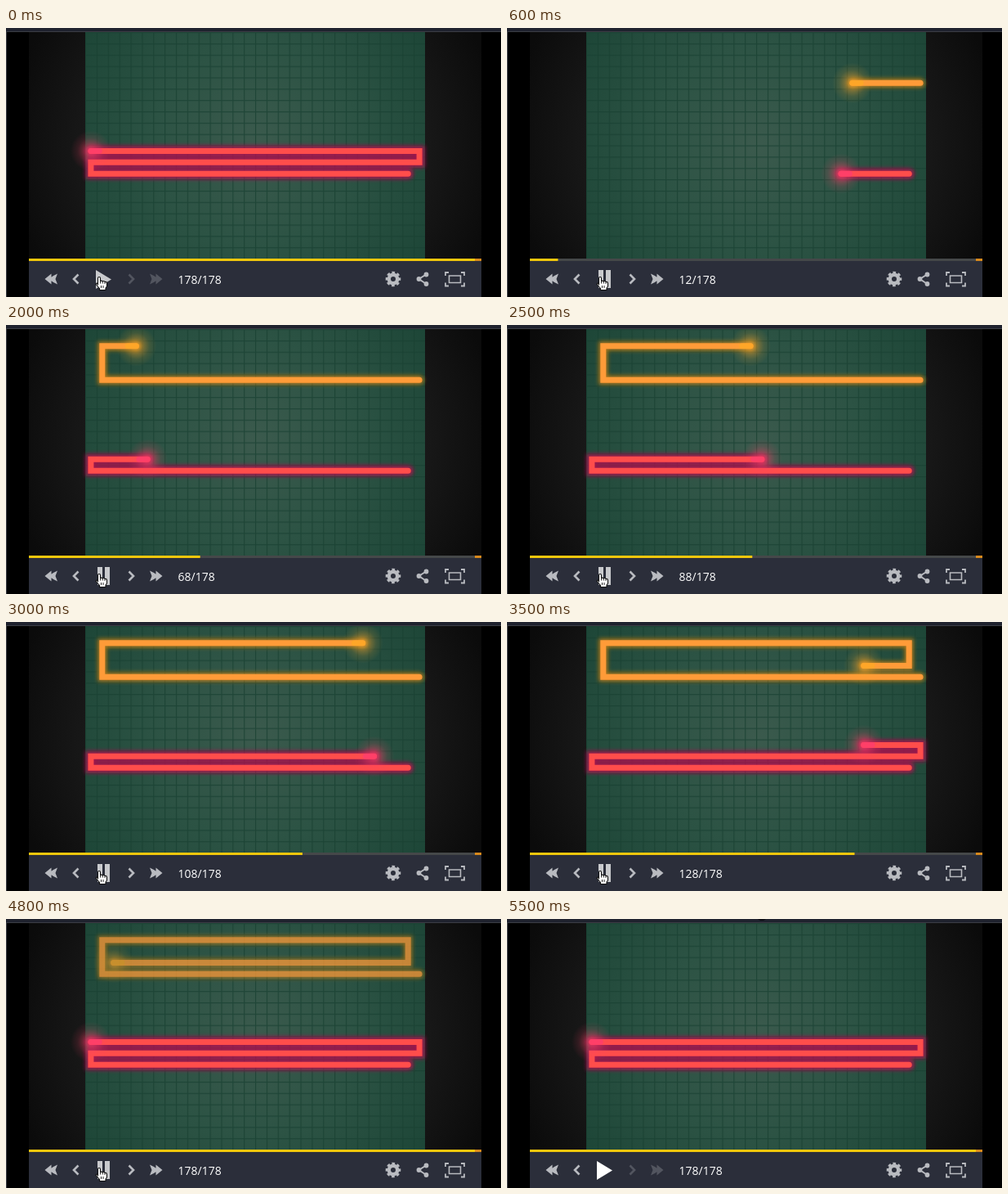
Animation, 606 px wide and 329 px high, one loop 6000 ms. Source, as an HTML page:

```html
<!DOCTYPE html>
<html lang="en">
<head>
<meta charset="utf-8">
<title>Light trails replay</title>
<style>
html, body { margin: 0; width: 100%; height: 100%; overflow: hidden; background: #000; }
svg { display: block; width: 100vw; height: 100vh; }
text { font: 14px "Open Sans", sans-serif; fill: #fff; }
.line { fill: none; stroke-linecap: round; stroke-linejoin: miter; }
</style>
</head>
<body>
<svg viewBox="0 0 606 329">
  <defs>
    <radialGradient id="floor" gradientUnits="userSpaceOnUse" cx="305" cy="143" r="250">
      <stop offset="0" stop-color="#3b5a4d"/>
      <stop offset=".5" stop-color="#2c5344"/>
      <stop offset="1" stop-color="#1d4637"/>
    </radialGradient>
    <radialGradient id="side" gradientUnits="userSpaceOnUse" cx="305" cy="143" r="300">
      <stop offset=".65" stop-color="#1a1a1a"/>
      <stop offset="1" stop-color="#0b0b0b"/>
    </radialGradient>
    <pattern id="grid" patternUnits="userSpaceOnUse" x="97" y="5" width="13.867" height="13.85">
      <path d="M0 .6H13.87M.6 0V13.85" stroke="#183f31" stroke-width="1.3" opacity=".75"/>
    </pattern>
    <filter id="blur" filterUnits="userSpaceOnUse" x="28" y="0" width="554" height="300">
      <feGaussianBlur stdDeviation="2.4"/>
    </filter>
    <clipPath id="view"><path d="M28 5H582V282H28Z"/></clipPath>
    <path id="chev" d="M7.5 1.5 2 7 7.5 12.5" fill="none" stroke-width="2.6"/>
    <path id="dbl" d="M8 .5V4.8L10.5 3 15.5 .5 13 7 15.5 13.5 10.5 11 8 9.2V13.5L0 7Z"/>
  </defs>

  <path fill="#1f222e" d="M0 0H606V4H0Z"/>
  <path fill="#3b3d44" d="M0 4H606V5H0ZM0 5H1V329H0Z"/>
  <path id="notch" fill="#0c0d12" d="M307 0H317L314 2H310Z"/>
  <path fill="url(#side)" d="M28 5H582V282H28Z"/>
  <path fill="url(#floor)" d="M97 5H513V282H97Z"/>
  <path fill="url(#grid)" d="M97 5H513V282H97Z"/>
  <g id="trails" clip-path="url(#view)"></g>

  <path fill="#2b2e3a" d="M28 285H582V329H28Z"/>
  <path fill="#454849" d="M28 282H582V285H28Z"/>
  <rect id="bar" x="28" y="282" height="3" fill="#f2c70c"/>
  <path fill="#d8891c" d="M574 282H582V285H574Z"/>

  <g fill="#b9bbc0" stroke="#b9bbc0" stroke-width="0">
    <use href="#dbl" x="47.5" y="300"/>
    <use href="#chev" x="81" y="300"/>
    <g id="next">
      <use href="#chev" transform="translate(158 300) scale(-1 1)"/>
      <use href="#dbl" transform="translate(191.5 300) scale(-1 1)"/>
    </g>
    <g fill="none">
      <circle cx="474" cy="307" r="5.2" stroke-width="4.4"/>
      <circle cx="474" cy="307" r="7.8" stroke-width="3" stroke-dasharray="3.5 2.626" stroke-dashoffset="1.75"/>
      <path d="M515 301 505.500 307 515 313.500" stroke-width="1.8"/>
      <path d="M542 299H538V303M557 299H561V303M542 315.500H538V311.500M557 315.500H561V311.500" stroke-width="1.8"/>
      <path d="M542.500 303H556.500V311.500H542.500Z" stroke-width="1.6"/>
    </g>
    <circle cx="514.500" cy="301.500" r="2.900"/>
    <circle cx="505.500" cy="307" r="2.900"/>
    <circle cx="514.500" cy="313" r="2.900"/>
  </g>
  <path id="play" d="M110 296 129 307.500 110 319Z"/>
  <path id="pause" fill="#c9cacd" d="M112 296H118V318H112ZM121 296H127V318H121Z"/>
  <text id="count" x="210.500" y="313"></text>
  <g id="hand">
    <path fill="#fff" stroke="#111" stroke-width="1.1" stroke-linejoin="round"
      d="M112.500 314V306Q112.500 304.500 114 304.500T115.500 306V309.500Q117 308.500 118.300 309.800 119.800 309 121 310.500 123.500 310 123.500 312.500V316L122 318V320.500H114.500V318.500L110.500 314Q109.800 312 111.500 312Z"/>
    <path fill="none" stroke="#111" stroke-width=".9" d="M115.500 309.500V312.500M118.300 310V312.500M121 310.500V313M116.500 315V318M119 315V318"/>
  </g>
</svg>
<script>
const LOOP = 6000, TURNS = 178, CELL = 13.867;
const NS = "http://www.w3.org/2000/svg";
const $ = id => document.getElementById(id);

function add(parent, tag, attrs) {
  const el = document.createElementNS(NS, tag);
  for (const k in attrs) el.setAttribute(k, attrs[k]);
  return parent.appendChild(el);
}

const show = (id, on) => $(id).setAttribute("visibility", on ? "visible" : "hidden");
const px = ([c, r]) => [97 + (c + .5) * CELL, 5 + (r + .5) * 13.85];
const toPath = pts => "M" + pts.map(p => px(p).map(v => v.toFixed(2)).join(" ")).join("L");

function makeRider(name, color, headColor, glow, glowWidth, glowAlpha, corners) {
  const g = add($("trails"), "g", {});
  const grad = add(g, "radialGradient", { id: name });
  [[0, .75], [.3, .42], [.65, .13], [1, 0]].forEach(([offset, alpha]) =>
    add(grad, "stop", { offset, "stop-color": headColor, "stop-opacity": alpha }));
  const line = (stroke, width, extra) =>
    add(g, "path", { class: "line", stroke, "stroke-width": width, ...extra });
  return {
    g, corners,
    glow: line(glow, glowWidth, { opacity: glowAlpha, filter: "url(#blur)" }),
    trail: line(color, 7),
    halo: add(g, "circle", { r: 25, fill: `url(#${name})` }),
    tip: line(headColor, 6.6)
  };
}

// Corners are [column, row] cells
const riders = [
  makeRider("amber", "#ff9b38", "#ffa628", "#e58a10", 11, .7,
    [[29, 4], [1, 4], [1, 1], [28, 1], [28, 3], [2, 3]]),
  makeRider("rose", "#ff4d4b", "#ff3f68", "#b30a50", 13, .85,
    [[28, 12], [0, 12], [0, 11], [29, 11], [29, 10], [0, 10]])
];

// Part of the route covered after a number of cell moves
function walk(corners, moves) {
  const pts = [corners[0]];
  for (let i = 1; i < corners.length; i++) {
    const [c, r] = corners[i - 1], [c2, r2] = corners[i];
    const len = Math.abs(c2 - c) + Math.abs(r2 - r);
    const k = Math.min(1, moves / len);
    pts.push([c + (c2 - c) * k, r + (r2 - r) * k]);
    if (moves <= len) break;
    moves -= len;
  }
  return pts;
}

function drawRider(rider, moves, alpha) {
  const pts = walk(rider.corners, moves), d = toPath(pts);
  const head = pts[pts.length - 1], prev = pts[pts.length - 2];
  const back = [0, 1].map(i => head[i] - Math.sign(head[i] - prev[i]) * .75);
  const [x, y] = px(head);
  rider.g.setAttribute("opacity", alpha);
  rider.glow.setAttribute("d", d);
  rider.trail.setAttribute("d", d);
  rider.tip.setAttribute("d", toPath([back, head]));
  rider.halo.setAttribute("cx", x);
  rider.halo.setAttribute("cy", y);
}

function draw(time) {
  const t = Math.floor(time % LOOP / 100) * 100;
  const idle = t < 300 || t >= 5100;
  const turn = t < 300 ? TURNS : Math.min(TURNS, Math.max(1, (t - 300) / 25));
  const moves = Math.floor(turn / 2);
  const fade = t < 300 ? 0 : Math.min(1, Math.max(0, (5100 - t) / 400));

  drawRider(riders[0], moves, fade);
  drawRider(riders[1], moves, 1);

  $("bar").setAttribute("width", 554 * (turn - 1) / (TURNS - 1));
  $("count").textContent = turn + "/" + TURNS;
  $("next").setAttribute("opacity", t < 300 || t >= 5200 ? .28 : idle ? .5 : 1);
  $("play").setAttribute("fill", t < 300 ? "#c9cacd" : "#fff");
  show("play", idle);
  show("pause", !idle);
  show("hand", t < 5000);
  show("notch", t >= 5500);
}

const start = performance.now();
function tick() {
  draw(performance.now() - start);
  requestAnimationFrame(tick);
}
tick();
</script>
</body>
</html>
```
